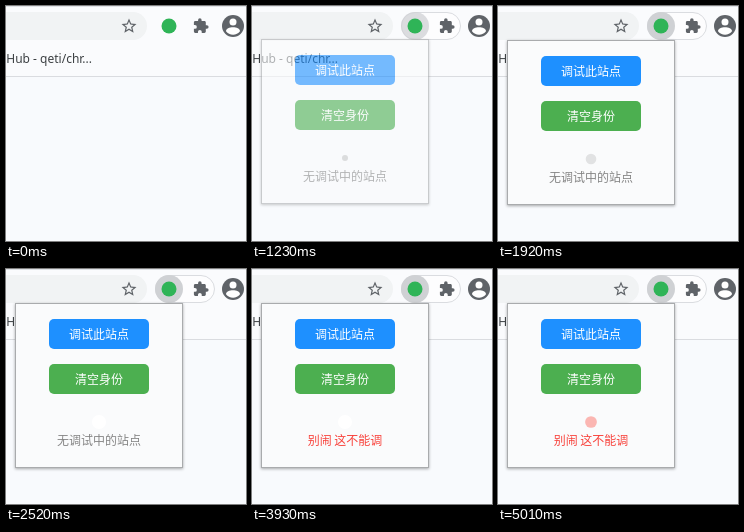
Animation of 240x235 px, one loop 5.04 s. Source, as an HTML page:

```html
<!DOCTYPE html>
<html lang="zh">
<head>
<meta charset="utf-8">
<style>
  html, body { margin: 0; height: 100%; overflow: hidden; }
  svg { display: block; width: 240px; height: 235px; }
  .cjk { font: 12px "Noto Sans CJK SC", "Noto Sans CJK", sans-serif; text-anchor: middle; }
  .latin { font: 12px "Noto Sans", "Open Sans", sans-serif; text-anchor: end; }
  #popup { filter: drop-shadow(0 1.5px 1.5px #0005); }
</style>
</head>
<body>
<svg viewBox="0 0 240 235">
  <rect width="240" height="235" fill="#f8fafd"/>
  <rect width="240" height="70" fill="#fafbfd"/>
  <rect width="240" height="1" fill="#dee1e6"/>
  <rect y="70" width="240" height="1" fill="#dadce0"/>
  <rect x="-40" y="6" width="181" height="28" rx="14" fill="#f1f3f4"/>

  <rect id="pill" x="149.5" y="6.5" width="59" height="27" rx="13.5" fill="#fdfdfe" stroke="#dadce0"/>
  <circle id="press" cx="163" cy="20" fill="#cfd1d4"/>
  <circle cx="163" cy="20" r="7.5" fill="#2fb457"/>

  <g fill="#5f6368">
    <path transform="translate(114 11) scale(.75)" d="M22 9.24l-7.19-.62L12 2 9.19 8.63 2 9.24l5.46 4.73L5.82 21 12 17.27 18.18 21l-1.63-7.03L22 9.24zM12 15.4l-3.76 2.27 1-4.28-3.32-2.88 4.38-.38L12 6.1l1.71 4.04 4.38.38-3.32 2.88 1 4.28L12 15.4z"/>
    <path transform="translate(186.5 11.5) scale(.7)" d="M20.5 11H19V7c0-1.1-.9-2-2-2h-4V3.500a2.500 2.500 0 0 0-5 0V5H4c-1.100 0-2 .9-2 2v3.800h1.500a2.700 2.700 0 0 1 0 5.400H2V20c0 1.100.9 2 2 2h3.800v-1.500a2.700 2.700 0 0 1 5.400 0V22H17c1.100 0 2-.9 2-2v-4h1.500a2.500 2.500 0 0 0 0-5z"/>
    <circle cx="227" cy="20" r="11"/>
  </g>
  <g fill="#fff">
    <circle cx="227" cy="16" r="3.5"/>
    <path d="M220 25.200c0-5.200 14-5.200 14 0-3.200 4.600-10.800 4.600-14 0z"/>
  </g>

  <text class="latin" x="86" y="57" fill="#3c4043">Hub - qeti/chr...</text>

  <g id="popup">
    <rect x="9.5" y="34.5" width="167" height="164" fill="#fafbfc" stroke="#a9abad"/>
    <rect x="43" y="50" width="100" height="30" rx="5" fill="#1e90ff"/>
    <rect x="43" y="95" width="100" height="30" rx="5" fill="#4caf50"/>
    <text class="cjk" x="93" y="70" fill="#fff">调试此站点</text>
    <text class="cjk" x="93" y="115" fill="#fff">清空身份</text>
    <text class="cjk" id="status" x="93" y="176"></text>
  </g>
  <circle id="dot" cx="93"/>
</svg>
<script>
  const LOOP = 5040, DENIED_AT = 2760;
  const PULSE_START = 1120, PULSE = 1430;
  const $ = id => document.getElementById(id);
  const ramp = (t, from, to) => Math.min(1, Math.max(0, (t - from) / (to - from)));
  const set = (id, attrs) => {
    for (const name in attrs) $(id).setAttribute(name, attrs[name]);
  };
  const toWhite = (rgb, k) => `rgb(${rgb.map(c => Math.round(c + (255 - c) * k))})`;

  function draw(t) {
    const denied = t >= DENIED_AT;
    const shown = ramp(t, 1110, 1310);
    const slide = -2.4 * (1 - shown);
    const pressed = ramp(t, 930, 1380);

    set('pill', { opacity: ramp(t, 630, 750) });
    set('press', { r: 14 * ramp(t, 900, 1100), opacity: 0.25 + 0.75 * pressed });
    set('popup', { opacity: shown, transform: `translate(0 ${slide})` });

    $('status').textContent = denied ? '别闹 这不能调' : '无调试中的站点';
    set('status', { fill: denied ? '#f8403a' : '#858585' });

    // The dot grows through each pulse and bleaches in the second half.
    const p = Math.max(0, t - PULSE_START) % PULSE / PULSE;
    set('dot', {
      cy: 153 + slide,
      r: t < PULSE_START ? 0 : 2 + 4.7 * p ** 0.6 + 0.5 * ramp(p, 0.8, 1),
      fill: toWhite(denied ? [244, 75, 66] : [219, 220, 221], ramp(p, 0.49, 0.88))
    });
  }

  function frame() {
    draw(performance.now() % LOOP);
    requestAnimationFrame(frame);
  }
  frame();
</script>
</body>
</html>
```
